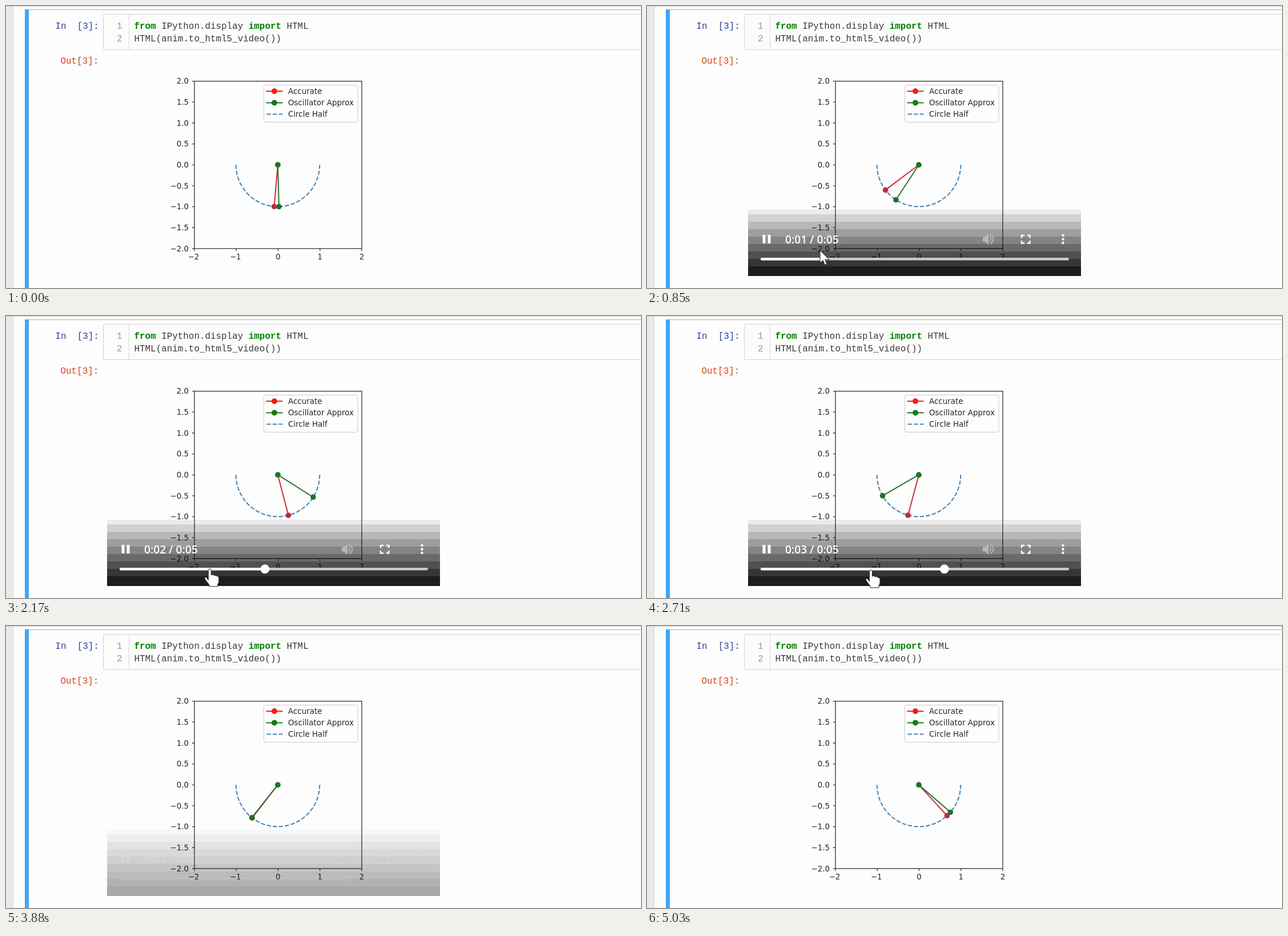
Animation, 1112 px wide and 494 px high, one loop 5100 ms. Source, as an HTML page:

```html
<!DOCTYPE html>
<html lang="en">
<head>
<meta charset="utf-8">
<title>Pendulum notebook</title>
<style>
html, body { margin: 0; width: 100%; height: 100%; overflow: hidden; background: #fdfdfd; }
svg { display: block; width: 1112px; height: 494px; }
.code { font: 15.9px "Liberation Mono", monospace; fill: #3a3a3a; }
.kw { font-weight: bold; fill: #008000; }
.num { fill: #999; }
.plot { font: 13.35px "DejaVu Sans", sans-serif; fill: #262626; }
.legend { font-size: 13.45px; }
.time { font: 600 19.2px "Open Sans", sans-serif; fill: #fff; }
.axis { fill: none; stroke: #333; stroke-width: 1.3; }
.arc { fill: none; stroke: #4682b4; stroke-width: 2; stroke-dasharray: 7.4 3.2; }
</style>
</head>
<body>
<svg viewBox="0 0 1112 494" xmlns="http://www.w3.org/2000/svg">
  <rect width="1112" height="494" fill="#fdfdfd"/>
  <rect width="12" height="494" fill="#e9e9e9"/>
  <rect x="12" width="1" height="494" fill="#d6d6d6"/>
  <rect width="1112" height="1" fill="#cfcfcf"/>
  <rect x="33" y="6" width="1079" height="1" fill="#ababab"/>
  <rect x="33" y="6" width="7" height="488" fill="#42a5f5"/>
  <rect x="170.5" y="14.5" width="960" height="62" rx="2" fill="#fcfcfc" stroke="#cfcfcf"/>
  <path d="M215.5 15V76" stroke="#d8d8d8"/>

  <g class="code">
    <text x="86.5" y="39.5" style="fill:#303f9f">In&nbsp;&nbsp;[3]:</text>
    <text x="95.5" y="100.5" style="fill:#d84315">Out[3]:</text>
    <text class="num" x="194" y="39.5">1</text>
    <text class="num" x="194" y="61.5">2</text>
    <text x="224.5" y="39.5"><tspan class="kw">from</tspan> IPython.display <tspan class="kw">import</tspan> HTML</text>
    <text x="224.5" y="61.5">HTML(anim.to_html5_video())</text>
  </g>

  <g class="plot">
    <rect class="axis" x="330" y="131.7" width="293" height="293.2"/>
    <path class="axis" id="ticks"/>
    <g id="labels"></g>
    <rect x="451.5" y="138.5" width="164.5" height="65" rx="3" fill="#fdfdfd" stroke="#ccc"/>
    <path d="M455.5 149.3H484.5" stroke="#e02026" stroke-width="2"/>
    <circle cx="470" cy="149.3" r="5" fill="#f02010"/>
    <path d="M455.5 169.5H484.5" stroke="#1a7a1a" stroke-width="2"/>
    <circle cx="470" cy="169.5" r="5" fill="#147d14"/>
    <path class="arc" d="M456.5 189.5H484.5"/>
    <g class="legend">
      <text x="494" y="154">Accurate</text>
      <text x="494" y="174.3">Oscillator Approx</text>
      <text x="494" y="194.3">Circle Half</text>
    </g>
    <path class="arc" d="M402.7 278.2A73.3 73.3 0 0 0 549.3 278.2"/>
  </g>

  <g id="red" stroke="#cc2a3c" fill="#c4283c">
    <path d="M476 278.2V351.5" stroke-width="2"/>
    <circle cx="476" cy="351.5" r="4.8" stroke="none"/>
  </g>
  <g id="green" stroke="#2c7036" fill="#1f6f2c">
    <path d="M476 278.2V351.5" stroke-width="2"/>
    <circle cx="476" cy="351.5" r="4.8" stroke="none"/>
  </g>
  <circle cx="476" cy="278.2" r="4.9" fill="#187a1c"/>

  <g id="shade"></g>
  <g id="controls">
    <path d="M202.5 401h5v15h-5zM211.5 401h5v15h-5z" fill="#fff"/>
    <text class="time" id="clock" x="242" y="416"></text>
    <g fill="none" stroke="#b8b8b8" stroke-width="2">
      <path d="M588 404.5h4l6-5.5v19l-6-5.5h-4z" fill="#b8b8b8" stroke="none"/>
      <path d="M600.5 404.5q3 4 0 8M601.5 400.2q10 8.3 0 16.6"/>
    </g>
    <path d="M656 406.5V402H661M666 402H670.5V406.5M670.5 411V415.5H666M661 415.5H656V411" fill="none" stroke="#fff" stroke-width="2.4"/>
    <g fill="#fff">
      <circle cx="728.5" cy="402" r="2.2"/>
      <circle cx="728.5" cy="408.5" r="2.2"/>
      <circle cx="728.5" cy="415" r="2.2"/>
    </g>
    <rect x="199" y="441" width="540" height="4.6" rx="2" fill="#cacaca"/>
    <rect id="played" x="199" y="441" height="4.6" rx="2" fill="#fff"/>
    <circle id="thumb" cy="443.3" r="8" fill="#fff"/>
  </g>
  <g id="cursor" fill="#fff" stroke="#222" stroke-linejoin="round">
    <path id="arrow" d="M0 0V22L5 17.5 8.5 25.5 12 24 8.8 16.3H16Z"/>
    <path id="hand" d="M-2.5 20V2.5a2.5 2.5 0 0 1 5 0V11q4-2 5 1 4-1.5 5 1 3.5-.5 3.5 3V22q0 3-2 5V31H-1V28L-8 19q-2-3 0-4 2-1 5.5 5Z"/>
  </g>
</svg>
<script>
const LOOP = 5100, DURATION = 5, SWING = 60;
const OMEGA = 6.26, OMEGA_TRUE = 5.834;
const $ = id => document.getElementById(id);

// Keys are rows [step, value, ...]
function at(keys, n, col = 1) {
  let i = 1;
  while (i < keys.length - 1 && n > keys[i][0]) i++;
  const a = keys[i - 1], b = keys[i];
  const k = Math.min(1, Math.max(0, (n - a[0]) / (b[0] - a[0])));
  return a[col] + (b[col] - a[col]) * k;
}

const videoTime = [[0, .255], [12, 1.161], [22, 1.926], [36, 3.005], [47, 3.839], [51, 4.155], [61.5, 5], [66, 5.404]];
const seekTime = [[0, .1], [12, 1.04], [21, 1.94], [36, 2.98], [45, 3.71]];
const shadeFade = [[2, 0], [5, 1], [46, 1], [47, .95], [51, .38], [54, 0]];
const controlFade = [[2, 0], [5, 1], [47, 1], [51, .1], [52, 0]];
const pointer = [[1, 810, 453], [2, 800, 452], [9, 308, 431], [12, 303, 428], [17, 312, 434], [22, 334, 441],
  [30, 360, 443], [36, 392, 445], [39, 440, 450], [43, 565, 470], [47, 587, 478], [51, 572, 500]];

function buildAxes() {
  let ticks = "", labels = "";
  const label = (x, y, anchor, text) =>
    `<text x="${x}" y="${y}" text-anchor="${anchor}">${text.replace("-", "\u2212")}</text>`;
  for (let i = 0; i < 9; i++) {
    const y = 131.7 + i * 36.65;
    ticks += `M326 ${y}H330`;
    labels += label(320, y + 4.7, "end", (2 - i / 2).toFixed(1));
  }
  for (let i = 0; i < 5; i++) {
    const x = 330 + i * 73.25;
    ticks += `M${x} 425V429`;
    labels += label(x - (i < 2 ? 1.5 : 0), 444.3, "middle", String(i - 2));
  }
  $("ticks").setAttribute("d", ticks);
  $("labels").innerHTML = labels;
}

function buildShade() {
  let bands = "";
  for (let i = 0; i < 9; i++) {
    const top = Math.max(357, 352 + 13 * i), bottom = i < 8 ? 365 + 13 * i : 473;
    bands += `<rect x="177" y="${top}" width="583" height="${bottom - top}" fill-opacity="${.07 + .102 * i}"/>`;
  }
  $("shade").innerHTML = bands;
}

const swing = (id, omega, s) =>
  $(id).setAttribute("transform", `rotate(${SWING * Math.cos(omega * s)} 476 278.2)`);
const show = (id, on) => $(id).setAttribute("visibility", on ? "visible" : "hidden");

function draw(ms) {
  const n = ms < 617 ? Math.floor(ms / 68.5) : 9 + Math.floor((ms - 611) / 77.5);
  const s = at(videoTime, n) % DURATION;
  swing("green", OMEGA, s);
  swing("red", OMEGA_TRUE, s);

  $("shade").setAttribute("opacity", at(shadeFade, n));
  $("controls").setAttribute("opacity", at(controlFade, n));
  $("clock").textContent = `0:0${Math.floor(s)} / 0:05`;
  const width = 540 * at(seekTime, n - n % 3) / DURATION;
  $("played").setAttribute("width", width);
  $("thumb").setAttribute("cx", 199 + width);
  $("thumb").setAttribute("fill", n > 43 ? "#e2e2e2" : "#fff");
  show("thumb", n >= 25);

  const hand = n >= 18 && n < 40, seen = n >= 1 && n < 50;
  $("cursor").setAttribute("transform", `translate(${at(pointer, n, 1)} ${at(pointer, n, 2)})`);
  show("hand", seen && hand);
  show("arrow", seen && !hand);
}

buildAxes();
buildShade();
const start = performance.now();
function tick() {
  draw((performance.now() - start) % LOOP);
  requestAnimationFrame(tick);
}
tick();
</script>
</body>
</html>
```
